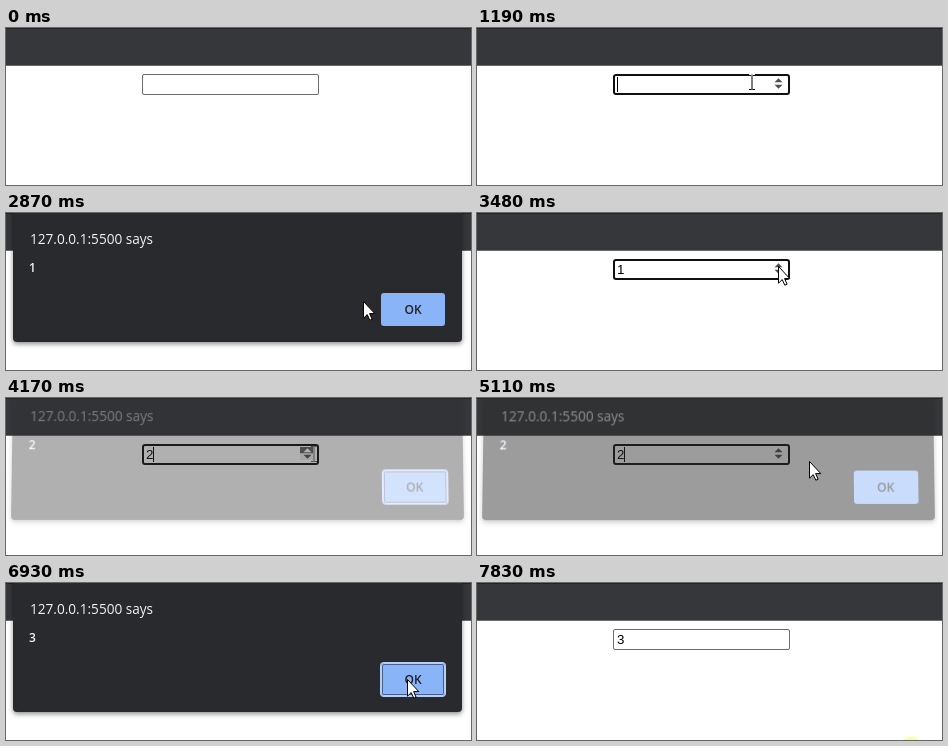
An HTML page that plays this animation: 465x157 px, repeating every 7960 ms.

```html
<!DOCTYPE html>
<html lang="en">
<head>
<meta charset="utf-8">
<title>Number input with alert</title>
<style>
  html, body { margin: 0; width: 100%; height: 100%; overflow: hidden; background: #fff; }
  #stage { position: absolute; left: 0; top: 0; width: 465px; height: 157px; overflow: hidden; background: #fff; }
  #stage div, #stage svg { position: absolute; box-sizing: border-box; }
  #bar { left: 0; top: 0; width: 465px; height: 38px; background: #36373a; border-top: 1px solid #232428; border-bottom: 1px solid #6a6b6e; }
  #field {
    left: 136px; top: 46px; width: 177px; height: 21px;
    border: 1px solid #6b6b6b; border-radius: 2px; background: #fff;
  }
  #field.focus { border: 2px solid #101010; border-radius: 3px; }
  #value { left: 140px; top: 46px; font: 13.333px/21px "Liberation Sans", Arial, sans-serif; color: #000; }
  #caret { top: 49px; width: 1px; height: 15px; background: #000; }
  #spin { left: 294px; top: 49px; }
  #halo { left: 419px; top: 154px; width: 30px; height: 30px; border-radius: 50%; background: #ffff8c; }
  #dialog {
    left: 6.5px; top: -20px; width: 449px; height: 149px;
    border-radius: 4px; background: #292a2d; color: #f1f3f4;
    box-shadow: 0 2px 5px rgba(0, 0, 0, .45);
    transform-origin: 50% 20px;
    font-family: "Open Sans", "Noto Sans", sans-serif;
  }
  #title { left: 17.5px; top: 36px; font-size: 13.6px; font-weight: 500; line-height: 20px; white-space: nowrap; }
  #message { left: 16.5px; top: 67px; font-size: 12px; font-weight: 600; line-height: 16px; }
  #ok {
    left: 368.5px; top: 100px; width: 64px; height: 33px; border-radius: 3px;
    background: #8ab4f8; color: #202124; font-size: 12px; font-weight: 600; line-height: 33px; text-align: center;
  }
  #ok.ring { box-shadow: inset 0 0 0 1px #b4cffb, inset 0 0 0 2px #4b5f84, 0 0 0 1px #b4cffb; }
  #pointer { left: 0; top: 0; overflow: visible; }
  #pointer.text { mix-blend-mode: difference; }
  #beam, #pointer.text #arrow { display: none; }
  #pointer.text #beam { display: inline; }
</style>
</head>
<body>
<div id="stage">
  <div id="bar"></div>
  <div id="field"></div>
  <div id="value"></div>
  <div id="caret"></div>
  <svg id="spin" width="15" height="13">
    <g id="pressed">
      <path fill="#636363" d="M0 0h15v6.5H0z"/>
      <path fill="#efefef" d="M0 6.5h15V13H0z"/>
    </g>
    <path id="up" d="M3.5 5.2h8L7.5 1.2z"/>
    <path fill="#505050" d="M3.5 7.8h8l-4 4z"/>
  </svg>
  <div id="halo"></div>
  <div id="dialog">
    <div id="title">127.0.0.1:5500 says</div>
    <div id="message"></div>
    <div id="ok">OK</div>
  </div>
  <svg id="pointer" width="14" height="20">
    <path id="arrow" fill="#fff" stroke="#000" d="M.5.5V17.2L4.2 13.6 6.8 19.2 9.1 18.2 6.6 12.6H11.8z"/>
    <path id="beam" fill="none" stroke="#fff" d="M-3-7.5h2.5L0-7 .5-7.5H3M0-7V7M-3 7.5h2.5L0 7l.5.5H3"/>
  </svg>
</div>
<script>
const LOOP = 7960, FOCUS = 720, LEAVE = 7400, BLUR = 7830, FADE = 190, BLINK = 530;
const FIELD = [230, 57], SPIN = [301, 53], OK = [400, 95], EXIT = [425, 165];
const $ = id => document.getElementById(id);

// Each round: press the spinner, alert opens, click OK, alert closes.
// out and back are points (time, x, y) the pointer passes on its way.
const rounds = [
  { press: 1730, open: 1800, close: 2900, out: [1940, 311, 71], back: [2870, 357, 88], rest: SPIN },
  { press: 3880, open: 4100, close: 5010, out: [4170, 308, 56], back: [5110, 332, 63], rest: SPIN },
  { press: 5890, open: 5960, close: 7000, out: [6030, 324, 67], back: [7110, 404, 105], rest: EXIT }
];

const path = [
  [70, 397, 146], [470, ...FIELD], [FOCUS, ...FIELD], [1470, ...SPIN],
  ...rounds.flatMap(r => [
    [r.press, ...SPIN], r.out, [r.close - 300, ...OK], [r.close - 100, ...OK],
    r.back, [r.close + 400, ...r.rest]
  ])
];

const clamp = v => Math.min(1, Math.max(0, v));
const show = (el, on) => { el.style.visibility = on ? 'visible' : 'hidden'; };

function pointAt(t) {
  const i = path.findIndex(k => k[0] > t);
  if (i < 1) return path.at(i).slice(1);
  const [t0, x0, y0] = path[i - 1], [t1, x1, y1] = path[i];
  const p = (t - t0) / (t1 - t0);
  return [x0 + (x1 - x0) * p, y0 + (y1 - y0) * p];
}

function drawField(t, round, value, held) {
  const focus = t >= FOCUS && t < BLUR;
  const since = t - (round ? round.press : FOCUS);
  $('field').className = focus ? 'focus' : '';
  $('value').textContent = value;
  $('caret').style.left = (value ? 147 : 140) + 'px';
  show($('caret'), focus && Math.floor(since / BLINK) % 2 === 0);
  show($('spin'), t > 460 && t < BLUR);
  show($('pressed'), held);
  $('up').setAttribute('fill', held ? '#fff' : '#505050');
}

function drawDialog(t, round, value, held) {
  const alpha = round ? clamp((t - round.open) / FADE) - clamp((t - round.close) / FADE) : 0;
  const tilt = 1 - alpha ** 4;
  const style = $('dialog').style;
  style.opacity = alpha;
  style.transform = tilt
    ? `perspective(1000px) translateY(${-8 * tilt}px) rotateX(${4 * tilt}deg)` : 'none';
  $('message').textContent = value;
  $('ok').className = held ? 'ring' : '';
}

function drawPointer(t, round) {
  const [x, y] = pointAt(t);
  const overText = x < 294 && y < 67;
  const opening = round && t > round.open + 60 && t < round.open + 130;
  $('pointer').style.transform = `translate(${Math.round(x)}px, ${Math.round(y)}px)`;
  $('pointer').setAttribute('class', overText || opening ? 'text' : '');
  show($('pointer'), t >= 70 && t < LEAVE);
}

function frame() {
  const t = performance.now() % LOOP;
  const count = rounds.filter(r => r.press <= t).length;
  const round = rounds[count - 1];
  const held = count > 0 && t < round.close - 60;
  drawField(t, round, count || '', held);
  drawDialog(t, round, count || '', held);
  drawPointer(t, round);
  show($('halo'), t >= BLUR);
  requestAnimationFrame(frame);
}
frame();
</script>
</body>
</html>
```
